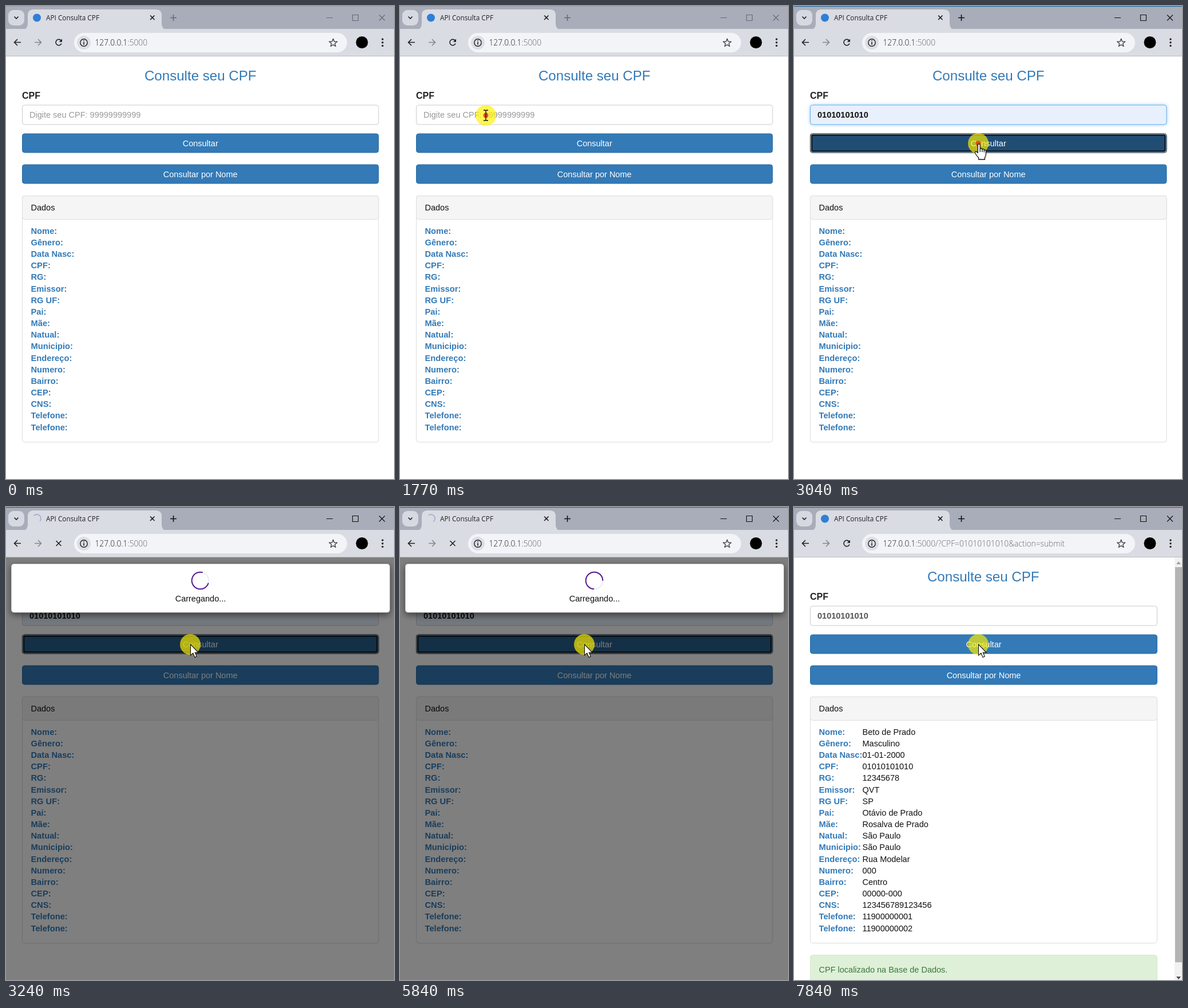
An HTML page that plays this animation: 678x826 px, repeating every 8000 ms.

```html
<!DOCTYPE html>
<html lang="pt-BR">
<head>
<meta charset="utf-8">
<title>API Consulta CPF</title>
<style>
html, body { margin: 0; width: 100%; height: 100%; overflow: hidden; background: #fff; }
svg { display: block; width: 678px; height: 826px; }
text { font: 14.5px "Liberation Sans", Arial, sans-serif; fill: #111; white-space: pre; }
.mid { text-anchor: middle; }
.title { font-size: 24.1px; fill: #337ab7; }
.label { font-size: 14.7px; font-weight: bold; fill: #337ab7; }
.light { fill: #fff; }
.tab { font: 11.8px "Open Sans", sans-serif; fill: #1f2024; }
.url { font: 300 13.75px "Open Sans", sans-serif; fill: #1f2024; }
.option { font: 600 11.15px "Open Sans", sans-serif; fill: #111; }
.icon { fill: none; stroke: #1f2024; stroke-width: 1.6; }
.thin { fill: none; stroke-width: 1.1; }
</style>
</head>
<body>
<svg id="stage" viewBox="0 0 678 826">
  <defs>
    <filter id="shadow" x="-10%" y="-30%" width="120%" height="170%">
      <feDropShadow dx="0" dy="4" stdDeviation="6" flood-opacity=".5"/>
    </filter>
    <filter id="soft" x="-10%" y="-20%" width="120%" height="150%">
      <feDropShadow dx="0" dy="2" stdDeviation="2" flood-opacity=".25"/>
    </filter>
    <filter id="glow" x="-2%" y="-30%" width="104%" height="160%">
      <feDropShadow dx="0" dy="0" stdDeviation="3" flood-color="#66afe9" flood-opacity=".6"/>
    </filter>
  </defs>
  <rect width="678" height="826" fill="#fff"/>

  <g id="page">
    <text id="title" class="mid title" y="130">Consulte seu CPF</text>
    <text x="28" y="162" style="font-size:16px;font-weight:bold;fill:#222">CPF</text>
    <rect id="field" class="wide" x="28.5" y="173" height="34" rx="4"/>
    <text id="value" x="41" y="195"></text>
    <rect id="search" class="wide" x="28.5" y="223" height="33" rx="4" stroke="#2e6da4"/>
    <g id="ring" fill="none">
      <rect x="28.5" y="223" width="622.5" height="33" rx="4" stroke="#222"/>
      <rect x="29.5" y="224" width="620.5" height="31" rx="3" stroke="#ddd"/>
      <rect x="31" y="225.5" width="617.5" height="28" rx="2" stroke="#0b0b0d" stroke-width="2"/>
    </g>
    <text class="mid light caption" y="244.5">Consultar</text>
    <rect class="wide" x="28.5" y="277" height="33" rx="4" fill="#337ab7" stroke="#2e6da4"/>
    <text class="mid light caption" y="298.5">Consultar por Nome</text>
    <rect class="wide" x="28.5" y="331.5" height="430" rx="4" fill="#fff" stroke="#ddd"/>
    <rect class="wide" x="28.5" y="331.5" height="41" rx="4" fill="#f5f5f5" stroke="#ddd"/>
    <text x="43.5" y="357">Dados</text>
    <g id="labels"></g>
    <g id="result">
      <g id="values"></g>
      <rect x="28.5" y="782.5" width="606" height="60" rx="4" fill="#dff0d8" stroke="#d6e9c6"/>
      <text id="notice" x="43.5" y="812.5" style="fill:#3c763d">CPF localizado na Base de Dados.</text>
      <rect x="665" y="88" width="13" height="738" fill="#f1f1f1"/>
      <rect x="666" y="105" width="12" height="690" fill="#b4b4b4"/>
      <path d="M668 100l4-5 4 5z" fill="#a0a0a0"/>
      <path d="M668 820l4 5 4-5z" fill="#505050"/>
    </g>
  </g>

  <g id="modal">
    <rect y="88" width="678" height="738" fill="#000" opacity=".5"/>
    <rect x="9" y="99" width="662" height="85.5" rx="5" fill="#fff" stroke="#555" stroke-width=".6" filter="url(#shadow)"/>
    <g fill="none" stroke-width="2">
      <circle cx="339.5" cy="128.5" r="14.8" stroke="#eee"/>
      <path id="loader" stroke="#561a92"/>
    </g>
    <text class="mid" x="340" y="164.5">Carregando...</text>
  </g>

  <g id="browser">
    <rect width="678" height="41" fill="#a8adb9"/>
    <rect id="edge" width="678" height="1.2"/>
    <rect x="4" y="7" width="28" height="27" rx="9" fill="#d6d9e1"/>
    <path class="icon" d="M14.5 18.5l3.5 3.5 3.5-3.5"/>
    <path d="M28 41Q38 41 38 31V16Q38 6 48 6H262Q272 6 272 16V31Q272 41 282 41Z" fill="#dadce3"/>
    <circle id="favicon" cx="54" cy="20.5" r="7" fill="#2f7fd6"/>
    <path id="throbber" fill="none" stroke="#a9afd2" stroke-width="1.8"/>
    <text class="tab" x="70" y="24.5">API Consulta CPF</text>
    <path class="icon" d="M252 16.5l7.5 7.5m0-7.5l-7.5 7.5"/>
    <g id="controls" class="thin">
      <path d="M287 20.5h11M292.5 15v11" stroke-width="1.6"/>
      <path d="M560 20.5h11M605.5 15.5h10v10h-10zM652 15.5l10 10m0-10l-10 10"/>
    </g>
    <rect y="40" width="678" height="47" fill="#dadce3"/>
    <rect y="87" width="678" height="1" fill="#b9bcc4"/>
    <path class="icon" d="M26 63.5H14.5m5.5-5.5l-5.5 5.5 5.5 5.5"/>
    <path class="icon" d="M50 63.5h11.5m-5.5-5.5l5.5 5.5-5.5 5.5" style="stroke:#85888f"/>
    <g id="reload">
      <path class="icon" d="M96.8 61A5.2 5.2 0 1 0 97 65.5"/>
      <path d="M98 57.5v5.2h-5.2z" fill="#1f2024"/>
    </g>
    <path id="stop" class="icon" d="M87.5 59l9 9m0-9l-9 9"/>
    <rect x="119" y="47" width="477" height="34" rx="17" fill="#f3f4f8"/>
    <circle cx="136" cy="64" r="12" fill="#dcdee5"/>
    <circle class="icon" cx="136" cy="64" r="6.2" style="stroke-width:1.4"/>
    <path class="icon" d="M136 63v4.5M136 60v1.6"/>
    <text class="url" x="155.5" y="69">127.0.0.1<tspan id="path" fill="#666a70"></tspan></text>
    <path id="star" class="icon" style="stroke-width:1.4;stroke:#44474e" stroke-linejoin="round"/>
    <circle cx="622" cy="63.5" r="10.5" fill="#000"/>
    <g fill="#1f2024"><circle cx="658" cy="58" r="1.7"/><circle cx="658" cy="63.7" r="1.7"/><circle cx="658" cy="69.4" r="1.7"/></g>
  </g>

  <g id="menu">
    <path d="M134 217H139L148.5 208L158 217H278Q285 217 285 224V290Q285 297 278 297H134Q127 297 127 290V224Q127 217 134 217Z" fill="#fdfbff" filter="url(#soft)"/>
    <g id="hover">
      <rect x="130.5" y="220" width="151" height="35.5" rx="4" fill="#efeef1"/>
      <path class="icon" d="M259 234l8.5 8.5m0-8.5l-8.5 8.5" style="stroke-width:1.3"/>
    </g>
    <text class="option" x="139" y="242.5">01010101010</text>
    <text class="option" x="139" y="278.5">01010101020</text>
  </g>

  <g id="cursor">
    <circle r="18" fill="#fff000" opacity=".67"/>
    <circle id="click" r="4.5" fill="#e03a10" opacity=".85"/>
    <path id="arrow" d="M.5 0V19L4.9 15.2L8 22.4L11.2 21L8.2 14H14Z" fill="#fff" stroke="#111" stroke-width="1.1"/>
    <g id="hand" stroke="#111" stroke-width="1.3" stroke-linejoin="round">
      <path d="M-.8 3Q-.8 .8 1.2 .8Q3.2 .8 3.2 3V10Q3.4 8.4 5 8.5Q6.8 8.6 6.8 10.6Q7.4 9.4 8.8 9.7Q10.2 10 10.2 12Q10.8 11 12 11.4Q13.4 11.8 13.4 14V19Q13.4 22 11.4 24.5V28H.6V25Q-2 22.5-5.2 17.5Q-6.4 15.6-5 14.4Q-3.4 13.4-.8 16.6Z" fill="#fff"/>
      <path d="M3.2 10V15M6.8 10.6V15M10.2 12V15.5" fill="none"/>
    </g>
    <path id="beam" d="M-4-9h3l1 1 1-1h3M0-8V8M-4 9h3l1-1 1 1h3" fill="none" stroke="#111" stroke-width="1.3"/>
  </g>
</svg>

<script>
const LOOP = 8000;
const FIRST = 500, STEP = 1000 / 15;
const ACTIVATE = 1770, PICK = 2500, PRESS = 2970, SUBMIT = 3100, DONE = 7495;

const rows = [
  ["Nome", "Beto de Prado"], ["Gênero", "Masculino"], ["Data Nasc", "01-01-2000"],
  ["CPF", "01010101010"], ["RG", "12345678"], ["Emissor", "QVT"], ["RG UF", "SP"],
  ["Pai", "Otávio de Prado"], ["Mãe", "Rosalva de Prado"], ["Natual", "São Paulo"],
  ["Municipio", "São Paulo"], ["Endereço", "Rua Modelar"], ["Numero", "000"],
  ["Bairro", "Centro"], ["CEP", "00000-000"], ["CNS", "123456789123456"],
  ["Telefone", "11900000001"], ["Telefone", "11900000002"]
];

// time, x, y of the pointer
const route = [
  [420, 700, 72], [1170, 376, 235], [1300, 370, 238], [1370, 370, 238],
  [1750, 150, 191], [1880, 150, 191], [2150, 203, 228], [2235, 203, 228],
  [2295, 203, 234], [2500, 203, 234], [2900, 322, 240]
];
const clicks = [[1750, 1880], [2440, 2560], [PRESS, SUBMIT]];

const $ = id => document.getElementById(id);
const set = (el, attrs) => { for (const k in attrs) el.setAttribute(k, attrs[k]); };
const show = (id, on) => $(id).style.display = on ? "" : "none";
const clamp = v => Math.max(0, Math.min(1, v));
const between = (t, a, b) => t >= a && t < b;

function addText(parent, cls, x, y, str) {
  const el = document.createElementNS("http://www.w3.org/2000/svg", "text");
  set(el, { class: cls, x, y });
  el.textContent = str;
  $(parent).append(el);
}

// bearings run clockwise from the top, in degrees
function arc(cx, cy, r, from, sweep) {
  const at = deg => {
    const a = deg * Math.PI / 180;
    return `${cx + r * Math.sin(a)} ${cy - r * Math.cos(a)}`;
  };
  return `M${at(from)}A${r} ${r} 0 ${sweep > 180 ? 1 : 0} 1 ${at(from + sweep)}`;
}

function pointer(t) {
  let i = 0;
  while (i < route.length - 2 && t >= route[i + 1][0]) i++;
  const [a, b] = [route[i], route[i + 1]];
  const p = clamp((t - a[0]) / (b[0] - a[0]));
  const e = p * p * (3 - 2 * p);
  return [a[1] + (b[1] - a[1]) * e, a[2] + (b[2] - a[2]) * e];
}

function build() {
  rows.forEach(([name, value], i) => {
    const y = 397.7 + i * 20.17;
    addText("labels", "label", 43.5, y, name + ":");
    addText("values", "", 119.5, y, value);
  });
  const pts = [...Array(10).keys()].map(i => {
    const r = i % 2 ? 3.1 : 7.4, a = i * Math.PI / 5;
    return `${571.7 + r * Math.sin(a)} ${64.5 - r * Math.cos(a)}`;
  });
  set($("star"), { d: `M${pts.join("L")}Z` });
}

function drawField(t, done, preview) {
  const focused = between(t, ACTIVATE, SUBMIT);
  const filled = t >= PICK;
  set($("field"), {
    fill: !done && (preview || filled) ? "#e8f0fe" : "#fff",
    stroke: focused ? "#66afe9" : "#ccc",
    filter: focused ? "url(#glow)" : "none"
  });
  const value = $("value");
  value.textContent = preview || filled ? "01010101010" : "Digite seu CPF: 99999999999";
  value.style.fontSize = preview ? "13.3px" : "";
  value.style.fontWeight = filled ? "bold" : "";
  value.style.fill = done ? "#555" : preview || filled ? "#111" : "#999";
}

function drawCursor(t, x, y, kind) {
  show("cursor", t >= FIRST);
  set($("cursor"), { transform: `translate(${x} ${y})` });
  for (const k of ["arrow", "hand", "beam"]) show(k, k === kind);
  show("click", clicks.some(([a, b]) => between(t, a, b)));
}

function render(time) {
  const t = time < FIRST ? time
    : FIRST + Math.floor((time - FIRST) / STEP + 0.07) * STEP;
  const done = t >= DONE;
  const loading = between(t, SUBMIT, DONE);
  const active = t >= ACTIVATE;
  const menu = between(t, ACTIVATE + 60, PICK);
  const [x, y] = pointer(t);
  const preview = menu && y > 218 && t > 1950;
  const onButton = !menu && !loading && !done && y > 222 && y < 257;
  const onField = !menu && !loading && y > 173 && y < 207 && x < 651;
  const right = done ? 634.5 : 651;

  for (const el of document.querySelectorAll(".wide")) set(el, { width: right - 28.5 });
  for (const el of document.querySelectorAll(".caption")) set(el, { x: done ? 331.5 : 339.7 });
  set($("title"), { x: done ? 330.7 : 339.7 });

  drawField(t, done, preview);
  const pressed = between(t, PRESS, SUBMIT);
  const hovered = (onButton && t > 1220) || loading;
  set($("search"), { fill: pressed ? "#204d74" : hovered ? "#286090" : "#337ab7" });
  show("ring", between(t, PRESS, DONE));

  show("result", done);
  $("notice").style.opacity = clamp((t - 7480) / 340);

  show("modal", loading);
  $("modal").style.opacity = clamp((t - SUBMIT + 60) / 180);
  const gap = 240 + (t - 4300) * 360 / 2154;
  set($("loader"), { d: arc(339.5, 128.5, 14.8, gap + 45, 270) });

  const spin = 20 - (t - 4300) * 360 / 1320;
  set($("throbber"), { d: arc(54, 20, 7, spin, 180) });
  show("throbber", loading);
  show("favicon", !loading);
  show("stop", loading);
  show("reload", !loading);
  $("path").textContent = ":5000" + (done ? "/?CPF=01010101010&action=submit" : "");
  set($("edge"), { fill: active ? "#2c6c9c" : "#999eaa" });
  set($("controls"), { stroke: active ? "#111" : "#666a73" });

  show("menu", menu);
  show("hover", preview);
  drawCursor(t, x, y, onButton ? "hand" : onField ? "beam" : "arrow");
}

build();
const start = performance.now();
function tick() {
  render((performance.now() - start) % LOOP);
  requestAnimationFrame(tick);
}
tick();
</script>
</body>
</html>
```
